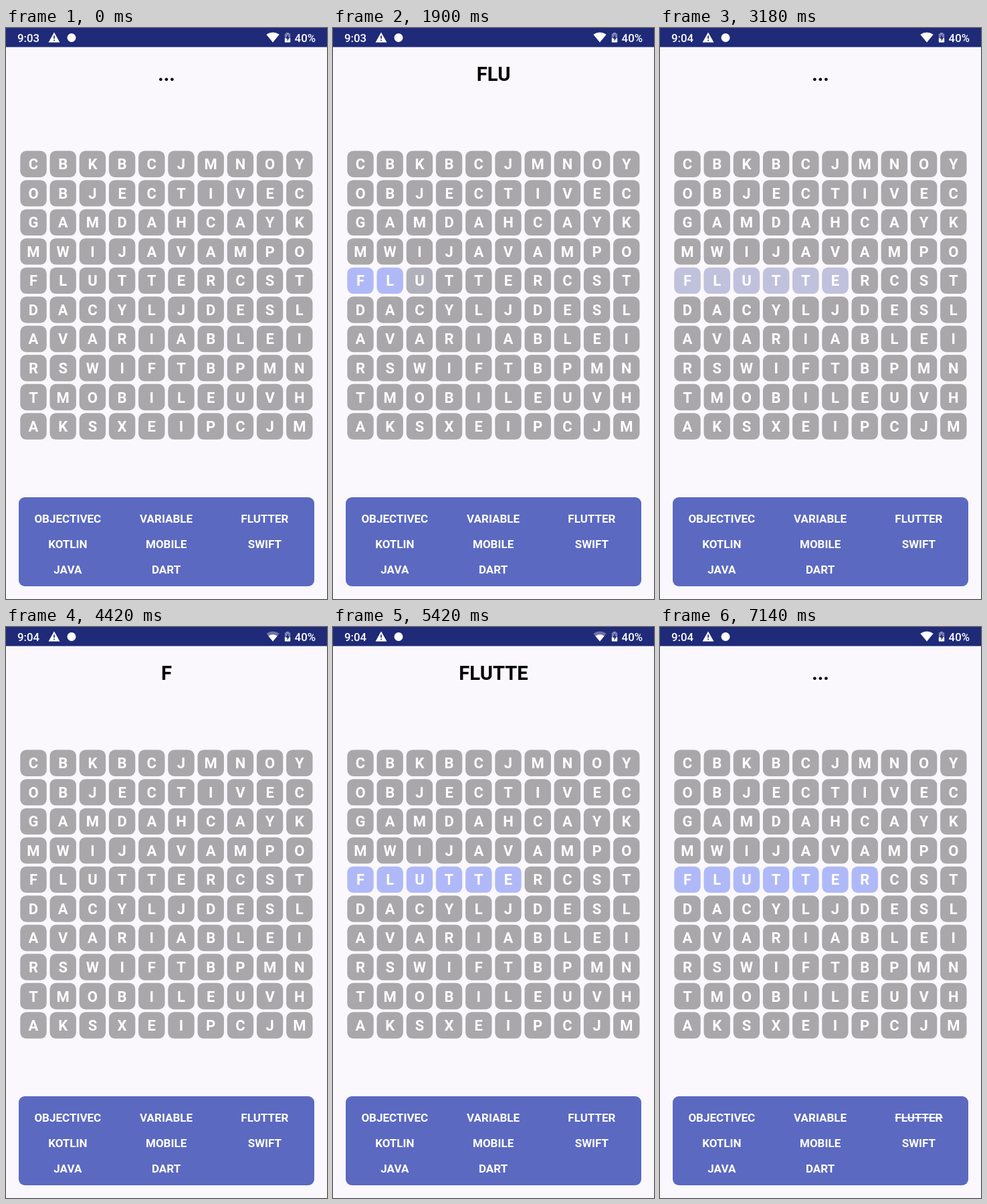
These frames come from a looping animation (480x853 px, 8 s). An HTML page with a canvas:

```html
<!DOCTYPE html>
<html lang="en">
<head>
<meta charset="utf-8">
<title>Word search</title>
<style>
  html, body { margin: 0; width: 100%; height: 100%; overflow: hidden; background: #faf8fc; }
  canvas { display: block; width: 480px; height: 853px; }
</style>
</head>
<body>
<canvas></canvas>
<script>
const LOOP = 8000, FADE = 200;
const BG = '#faf8fc', BAR = '#1f2a78', GREY = '#a9a7aa', BLUE = '#b0b9f7', PANEL = '#5b69c1';
const ROWS = ['CBKBCJMNOY', 'OBJECTIVEC', 'GAMDAHCAYK', 'MWIJAVAMPO', 'FLUTTERCST',
  'DACYLJDESL', 'AVARIABLEI', 'RSWIFTBPMN', 'TMOBILEUVH', 'AKSXEIPCJM'];
const WORDS = ['OBJECTIVEC', 'VARIABLE', 'FLUTTER', 'KOTLIN', 'MOBILE', 'SWIFT', 'JAVA', 'DART'];
const WORD_ROW = 4;

// Time at which each letter of the word is touched, and when the finger lifts
const SWIPES = [
  { touches: [1260, 1560, 1880, 2180, 2480, 2780], release: 3060, solved: false },
  { touches: [4420, 4600, 4760, 4910, 5060, 5220, 6740], release: 6940, solved: true }
];

const canvas = document.querySelector('canvas');
const ctx = canvas.getContext('2d');
const dpr = window.devicePixelRatio || 1;
canvas.width = 480 * dpr;
canvas.height = 853 * dpr;
ctx.scale(dpr, dpr);

const fade = (t, start) => Math.min(1, Math.max(0, (t - start) / FADE));

function text(s, x, y, size, color = '#fff', weight = 700, align = 'center') {
  ctx.font = `${weight} ${size}px Roboto, sans-serif`;
  ctx.textAlign = align;
  ctx.fillStyle = color;
  ctx.fillText(s, x, y);
}

function box(x, y, w, h, r, color, alpha = 1) {
  ctx.globalAlpha = alpha;
  ctx.fillStyle = color;
  ctx.beginPath();
  ctx.roundRect(x, y, w, h, r);
  ctx.fill();
  ctx.globalAlpha = 1;
}

function shape(d, color, alpha = 1) {
  ctx.globalAlpha = alpha;
  ctx.fillStyle = color;
  ctx.fill(new Path2D(d));
  ctx.globalAlpha = 1;
}

function statusBar(t) {
  box(0, 0, 480, 28.5, 0, BAR);
  text(t < 2400 ? '9:03' : '9:04', 17, 21, 16.8, '#fff', 500, 'left');
  text('40%', 463, 21, 16.8, '#fff', 500, 'right');

  shape('M72 6.5L80.5 21.5H63.5Z', '#fff');
  box(71.2, 11.5, 1.7, 4.5, 0, BAR);
  box(71.2, 17.4, 1.7, 1.8, 0, BAR);
  box(91.5, 8, 13, 13, 6.5, '#fff');

  const weak = t >= 3500 && t < 6540;
  shape('M399 21.5L389.3 9.7Q399 3.5 408.7 9.7Z', '#fff', weak ? 0.35 : 1);
  if (weak) shape('M399 21.5L392.3 13.4Q399 9 405.7 13.4Z', '#fff');

  box(419, 6.8, 4, 2, 0, '#fff', 0.4);
  box(416.8, 8.3, 8.4, 6.7, 0.8, '#fff', 0.4);
  box(416.8, 15, 8.4, 6.5, 0.8, '#fff');
  shape('M422 9.8L418.3 15.8H420.6V20L424 14H422Z', BAR);
}

// How far a letter of the word has turned blue
function litAmount(t, i) {
  let lit = 0;
  for (const { touches, release, solved } of SWIPES) {
    if (!(t >= touches[i])) continue;
    lit = fade(t, touches[i]) * (solved ? 1 : 1 - fade(t, release));
  }
  return lit;
}

function grid(t) {
  ROWS.forEach((row, r) => [...row].forEach((letter, c) => {
    const x = 41 + c * 44.2, y = 203.3 + r * 43.53;
    const lit = r === WORD_ROW ? litAmount(t, c) : 0;
    if (lit < 1) box(x - 19.7, y - 19.7, 39.4, 39.4, 9, GREY, 1 - lit);
    if (lit > 0) box(x - 19.7, y - 19.7, 39.4, 39.4, 9, BLUE, lit);
    text(letter, x, y + 8, 22);
  }));
}

function title(t) {
  const swipe = SWIPES.find(s => t >= s.touches[0] && t < s.release);
  const count = swipe ? swipe.touches.filter(start => t >= start).length : 0;
  text(count ? 'FLUTTER'.slice(0, count) : '...', 240, 79.2, 29.2, '#000');
}

function wordList(t) {
  box(19, 701, 442, 133, 9, PANEL);
  WORDS.forEach((word, i) =>
    text(word, 92.3 + i % 3 * 147.3, 739 + Math.floor(i / 3) * 38, 17));
  box(351.5, 732.3, 71.5, 1.5, 0, '#fff', fade(t, SWIPES[1].release));
}

function draw(now) {
  const t = now % LOOP;
  box(0, 0, 480, 853, 0, BG);
  statusBar(t);
  title(t);
  grid(t);
  wordList(t);
  requestAnimationFrame(draw);
}
requestAnimationFrame(draw);
</script>
</body>
</html>
```
